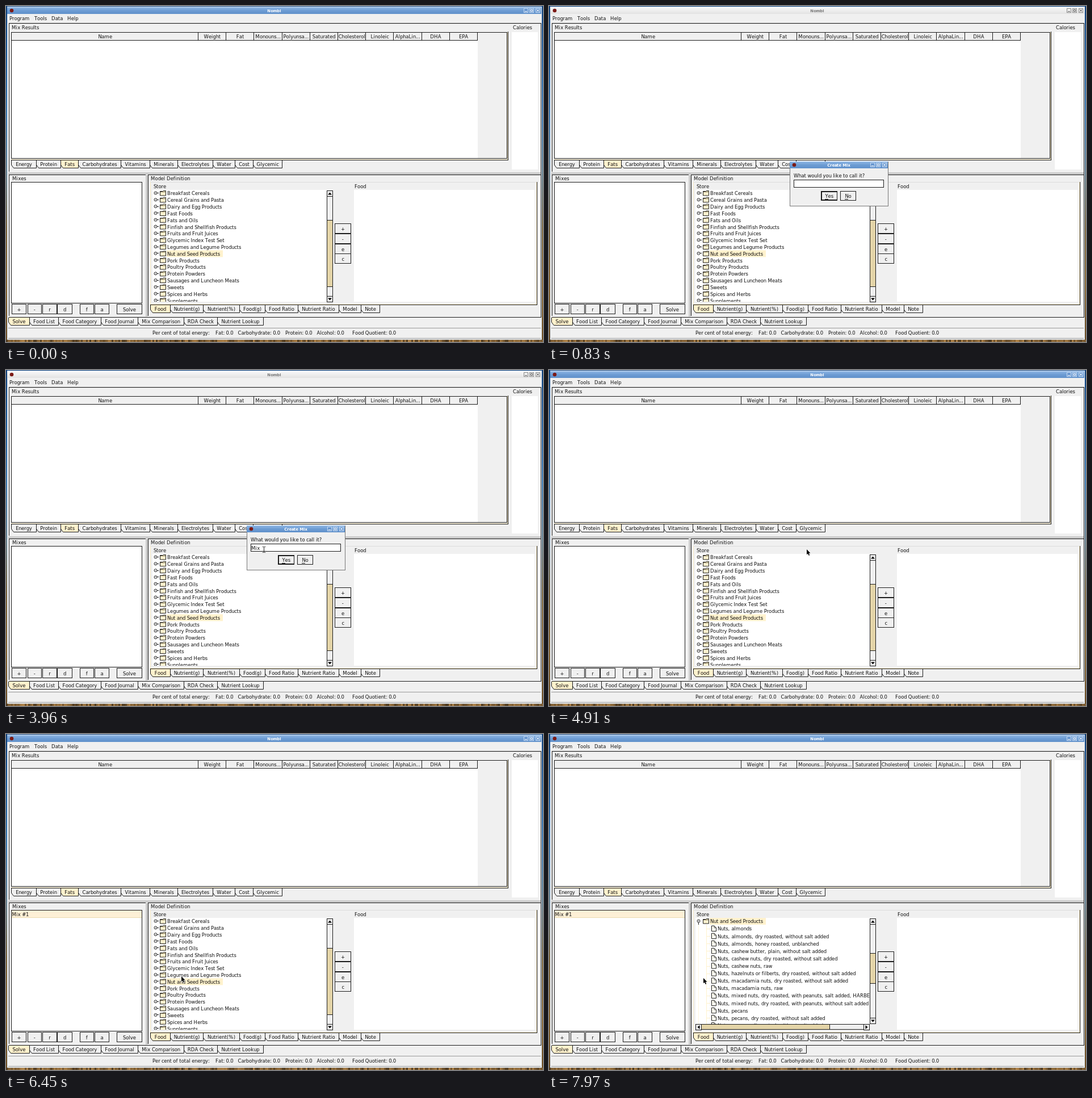
Animation, 946 px wide and 592 px high, one loop 8 s. Source, as an HTML page with a canvas:

```html
<!DOCTYPE html>
<html lang="en">
<head>
<meta charset="utf-8">
<title>Diet planner</title>
<style>
html, body { margin: 0; width: 100%; height: 100%; overflow: hidden; }
canvas { display: block; }
</style>
</head>
<body>
<canvas id="stage" width="946" height="592"></canvas>
<script>
const ctx = document.getElementById('stage').getContext('2d');
const LOOP = 8000, ZOOM = 0.845;
const INK = '#1c1c1c', BG = '#f0f0f0', CREAM = '#fff2cd', WHITE = '#fff';

const rect = (x, y, w, h, fill) => { ctx.fillStyle = fill; ctx.fillRect(x, y, w, h); };
const hline = (x0, x1, y, c = INK) => rect(x0, y, x1 - x0, 1, c);
const vline = (x, y0, y1, c = INK) => rect(x, y0, 1, y1 - y0, c);
const box = (x, y, w, h, fill, edge = INK) => {
  rect(x, y, w, h, edge);
  rect(x + 1, y + 1, w - 2, h - 2, fill);
};

function poly(points, fill, edge, width = 1) {
  ctx.beginPath();
  points.forEach(([x, y]) => ctx.lineTo(x, y));
  if (fill) { ctx.closePath(); ctx.fillStyle = fill; ctx.fill(); }
  if (edge) { ctx.strokeStyle = edge; ctx.lineWidth = width; ctx.stroke(); }
}

function circle(x, y, r, fill, edge) {
  ctx.beginPath();
  ctx.arc(x, y, r, 0, 7);
  ctx.fillStyle = fill;
  ctx.fill();
  if (edge) { ctx.strokeStyle = edge; ctx.lineWidth = 1; ctx.stroke(); }
}

function gradient(x0, y0, x1, y1, colors) {
  const g = ctx.createLinearGradient(x0, y0, x1, y1);
  colors.forEach((c, i) => g.addColorStop(i / (colors.length - 1), c));
  return g;
}

function checker(base, dot) {
  const tile = document.createElement('canvas');
  tile.width = tile.height = 2;
  const p = tile.getContext('2d');
  p.fillStyle = base;
  p.fillRect(0, 0, 2, 2);
  p.fillStyle = dot;
  p.fillRect(0, 0, 1, 1);
  p.fillRect(1, 1, 1, 1);
  return ctx.createPattern(tile, 'repeat');
}
const GRIP = checker('#f4f4f4', '#a2a2a2'), THUMB = checker('#fff0c4', '#c9b98c');

// Text keeps whole-unit letter advances, then the line is scaled as a whole.
const advances = {};
function setFont(font) { ctx.font = font + ' "DejaVu Sans", sans-serif'; }
function advance(ch, font) {
  const key = font + ch;
  if (!(key in advances)) advances[key] = ch === ',' ? 4 : Math.round(ctx.measureText(ch).width);
  return advances[key];
}
function text(s, x, y, { center = false, color = '#111', font = '10px' } = {}) {
  ctx.save();
  setFont(font);
  const steps = [...s].map(ch => advance(ch, font));
  const width = steps.reduce((a, b) => a + b, 0);
  ctx.translate(center ? x - width * ZOOM / 2 : x, y);
  ctx.scale(ZOOM, ZOOM);
  ctx.fillStyle = color;
  let pen = 0;
  [...s].forEach((ch, i) => { ctx.fillText(ch, pen, 0); pen += steps[i]; });
  ctx.restore();
  return width * ZOOM;
}

function button(label, x, y, w, h, fill = BG) {
  box(x, y, w, h, fill);
  text(label, x + w / 2, y + h / 2 + 3.5, { center: true });
}

function tabs(labels, edges, y, selected) {
  labels.forEach((label, i) => {
    const a = edges[i] + 0.5, b = edges[i + 1] + 0.5, bottom = y + 13.5;
    poly([[a, y], [a, y + 8], [a + 4, bottom], [b, bottom], [b, y]], i === selected ? CREAM : BG);
    poly([[a, y], [a, y + 8], [a + 4, bottom], [b, bottom], [b, y]], null, INK);
    text(label, (a + b) / 2, y + 10, { center: true });
  });
}

function titleBar(x, y, w, label, active) {
  const fill = active ? gradient(0, y, 0, y + 12, ['#92b9e6', '#6d9cd3', '#5f90ca'])
                      : gradient(0, y, 0, y + 12, ['#fafafa', '#e2e2e2']);
  const tint = active ? WHITE : '#555';
  rect(x, y, w, 12, fill);
  circle(x + 8, y + 6, 3.3, '#7c1a16');
  text(label, x + w / 2, y + 8.7, { center: true, font: 'bold 8px', color: active ? WHITE : '#777' });
  [27, 17, 6].forEach((d, i) => {
    const cx = x + w - d;
    box(cx - 4, y + 2, 8, 8, active ? '#6796cf' : '#f2f2f2', active ? '#c9dcf3' : '#888');
    if (i === 0) rect(cx - 2, y + 7, 4, 1, tint);
    if (i === 1) box(cx - 2, y + 4, 4, 4, active ? '#6796cf' : WHITE, tint);
    if (i === 2) {
      poly([[cx - 2, y + 4], [cx + 2, y + 8]], null, tint);
      poly([[cx + 2, y + 4], [cx - 2, y + 8]], null, tint);
    }
  });
}

function arrowButton(x, y, dx, dy) {
  box(x, y, 11, 11, BG);
  const cx = x + 5.5, cy = y + 5.5;
  poly([[cx + dx * 2, cy + dy * 2], [cx - dx * 2 - dy * 3.5, cy - dy * 2 - dx * 3.5],
        [cx - dx * 2 + dy * 3.5, cy - dy * 2 + dx * 3.5]], '#000');
}

function verticalBar(bottom, from, to) {
  box(565, 325, 11, bottom - 325, BG);
  box(565, from, 11, to - from, THUMB);
  arrowButton(565, 325, 0, -1);
  arrowButton(565, bottom - 11, 0, 1);
}

function desktop() {
  rect(0, 0, 946, 592, gradient(0, 0, 0, 592,
    ['#0d3e78', '#1c5c9c', '#3a78b0', '#64808f', '#7a6238', '#85632e', '#6a4a20']));
  for (let x = 0; x < 946; x += 3) {
    const n = Math.abs(Math.sin(x * 12.9898) * 43758.5) % 1;
    rect(x, 588, 3, 4, `hsl(34 40% ${22 + n * 28}%)`);
  }
}

function results() {
  hline(5, 942, 30);
  vline(5, 30, 292);
  hline(6, 942, 31, '#d8d8d8');
  text('Mix Results', 10, 41);
  text('Calories', 893, 41);
  rect(891, 46, 46, 242, WHITE);
  vline(884, 45, 271);
  hline(9, 885, 271);
  hline(9, 884, 270, CREAM);
  vline(883, 46, 270, CREAM);
  box(9, 46, 874, 223, BG);
  rect(10, 61, 821, 207, WHITE);
  const heads = ['Name', 'Weight', 'Fat', 'Monouns...', 'Polyunsa...', 'Saturated',
    'Cholesterol', 'Linoleic', 'AlphaLin...', 'DHA', 'EPA'];
  heads.forEach((label, i) => {
    const right = 338 + i * 49.2, left = i ? right - 49.2 : 10;
    vline(Math.round(right), 46, 61);
    text(label, (left + right) / 2 + 0.7, 56.5, { center: true });
  });
  hline(10, 831, 60);
  tabs(['Energy', 'Protein', 'Fats', 'Carbohydrates', 'Vitamins', 'Minerals', 'Electrolytes',
    'Water', 'Cost', 'Glycemic'], [9, 53, 96, 127, 202, 253, 302, 364, 403, 435, 486], 272, 2);
}

function mixes(t) {
  rect(4, 293, 938, 4, GRIP);
  rect(246, 298, 4, 249, GRIP);
  hline(5, 246, 297);
  vline(5, 297, 546);
  text('Mixes', 11, 306.5);
  box(9, 310, 231, 214, WHITE);
  if (t >= 4970) {
    rect(10, 311, 229, 12, '#fdf0d6');
    hline(10, 239, 323, '#eadab0');
    text('Mix #1', 10.5, 320.5);
  }
  const keys = [['+', 10, 26], ['-', 38, 25], ['r', 64, 26], ['d', 90, 27], ['f', 130, 25],
    ['a', 156, 26], ['Solve', 195, 45]];
  keys.forEach(([label, x, w]) => button(label, x, 525, w, 18));
  if (t >= 500 && t < 830) {
    button('+', 10, 525, 26, 18, t < 540 ? '#e6d9b4' : BG);
    ctx.strokeStyle = '#b8ab83';
    ctx.lineWidth = 1;
    ctx.strokeRect(13.5, 528.5, 19, 11);
  }
}

function folder(y) {
  poly([[271.5, y - 3.5], [276, y - 3.5], [277, y - 4.5], [281.5, y - 4.5],
        [281.5, y + 4], [271.5, y + 4]], CREAM, INK);
  poly([[271.5, y + 4], [271.5, y - 3.5]], null, INK);
  hline(272, 282, Math.round(y - 3), '#6a6047');
}

function handle(y, open) {
  if (open) vline(263, y + 2, y + 6);
  else hline(265, 269, Math.round(y) - 1);
  circle(263.5, y - 0.5, 2.5, WHITE, INK);
  rect(263, Math.round(y) - 1, 1, 1, INK);
}

function groupRow(label, y, selected, open) {
  handle(y, open);
  folder(y);
  if (selected) rect(283, y - 6, 99, 12, CREAM);
  text(label, 284, y + 3.4);
}

const GROUPS = ['Breakfast Cereals', 'Cereal Grains and Pasta', 'Dairy and Egg Products',
  'Fast Foods', 'Fats and Oils', 'Finfish and Shellfish Products', 'Fruits and Fruit Juices',
  'Glycemic Index Test Set', 'Legumes and Legume Products', 'Nut and Seed Products',
  'Pork Products', 'Poultry Products', 'Protein Powders', 'Sausages and Luncheon Meats',
  'Sweets', 'Spices and Herbs', 'Supplements'];
const NUTS = ['almonds', 'almonds, dry roasted, without salt added',
  'almonds, honey roasted, unblanched', 'cashew butter, plain, without salt added',
  'cashew nuts, dry roasted, without salt added', 'cashew nuts, raw',
  'hazelnuts or filberts, dry roasted, without salt added',
  'macadamia nuts, dry roasted, without salt added', 'macadamia nuts, raw',
  'mixed nuts, dry roasted, with peanuts, salt added, HARBEL',
  'mixed nuts, dry roasted, with peanuts, without salt added', 'pecans',
  'pecans, dry roasted, without salt added', 'pecans, oil roasted, without salt added'];

function store(open) {
  const bottom = open ? 511 : 521;
  rect(258, 324, 307, bottom - 324, WHITE);
  ctx.save();
  ctx.beginPath();
  ctx.rect(258, 324, 307, bottom - 324);
  ctx.clip();
  if (open) {
    vline(263, 336, 511, '#fff6dd');
    vline(277, 336, 511, '#fff2cd');
    groupRow('Nut and Seed Products', 330, true, true);
    NUTS.forEach((name, i) => {
      const y = 343 + i * 13.12;
      hline(278, 284, Math.round(y), '#fff2cd');
      poly([[286.5, y - 5], [291, y - 5], [294.5, y - 1.5], [294.5, y + 4.5], [286.5, y + 4.5], [286.5, y - 5]],
        '#fffdf2', INK);
      poly([[291, y - 5], [291, y - 1.5], [294.5, y - 1.5]], null, INK, 0.7);
      text('Nuts, ' + name, 297, y + 3.4);
    });
  } else {
    GROUPS.forEach((name, i) => groupRow(name, 330 + i * 11.82, i === 9, false));
  }
  ctx.restore();
  if (open) {
    verticalBar(511, 386, 440);
    box(258, 511, 307, 10, BG);
    box(268, 511, 227, 10, THUMB);
    arrowButton(258, 511, -1, 0);
    arrowButton(554, 511, 1, 0);
  } else {
    verticalBar(522, 377, 495);
  }
}

function model(open) {
  hline(250, 942, 297);
  vline(250, 297, 546);
  text('Model Definition', 255, 306.5);
  hline(254, 935, 310, '#dcdcdc');
  vline(254, 310, 526, CREAM);
  vline(934, 310, 526, CREAM);
  vline(935, 310, 527);
  hline(254, 935, 525, CREAM);
  hline(254, 936, 526);
  text('Store', 260, 320.5);
  text('Food', 614, 320.5);
  rect(613, 324, 318, 197, WHITE);
  store(open);
  ['+', '-', 'e', 'c'].forEach((label, i) =>
    button(label, 579, Math.round(383 + i * 17.8), 29, 18));
  tabs(['Food', 'Nutrient(g)', 'Nutrient(%)', 'Food(g)', 'Food Ratio', 'Nutrient Ratio', 'Model', 'Note'],
    [254, 289, 347, 411, 456, 514, 586, 625, 658], 527, 0);
}

function footer() {
  hline(5, 943, 548);
  vline(942, 30, 549);
  tabs(['Solve', 'Food List', 'Food Category', 'Food Journal', 'Mix Comparison', 'RDA Check', 'Nutrient Lookup'],
    [4, 41, 92, 167, 232, 313, 372, 453], 549, 0);
  hline(4, 942, 567, '#9a9a9a');
  hline(4, 942, 585, '#9a9a9a');
  const parts = [['Per cent of total energy:', 258], ['Fat: 0.0', 369], ['Carbohydrate: 0.0', 408.5],
    ['Protein: 0.0', 492], ['Alcohol: 0.0', 547.5], ['Food Quotient: 0.0', 610]];
  parts.forEach(([label, x]) => text(label, x, 579));
}

const TYPING = [[2760, 'M'], [2930, 'Mi'], [3240, 'Mix'], [3440, 'Mix '], [4350, 'Mix #'], [4480, 'Mix #1']];

function dialog(t) {
  box(424, 274, 174, 79, BG, '#777');
  titleBar(424, 274, 173, 'Create Mix', true);
  if (t < 830) return;
  text('What would you like to call it?', 431, 301.7);
  box(431, 306, 159, 14, WHITE);
  const typed = TYPING.filter(([at]) => t >= at).map(([, s]) => s).pop() || '';
  const width = text(typed, 432, 316.5);
  const caret = t >= 1670 && t < 2200 || t >= 2680 && t < 3960 || t >= 4350;
  if (caret) vline(Math.round(432 + width), 308, 319, '#000');
  box(479, 326, 29, 17, BG);
  ctx.strokeStyle = INK;
  ctx.lineWidth = 1;
  ctx.strokeRect(480.5, 327.5, 27, 14);
  text('Yes', 493.7, 338, { center: true });
  hline(486, 492, 340);
  button('No', 513, 326, 28, 17);
  hline(521, 527, 340);
}

// Pointer stops: time, x, y. Moves are sampled every 40 ms.
const PATH = [[4910, 454, 316], [6050, 454, 316], [6130, 438, 329], [6250, 380, 378], [6450, 309, 427],
  [6600, 281, 434], [6770, 269, 435], [6980, 269, 435], [7140, 266, 434], [7570, 266, 434],
  [7730, 270, 435], [7850, 273, 433], [7970, 272, 430], [8000, 272, 430]];

function pointer(t) {
  const start = t < 7000 ? 6090 : t < 7500 ? 7020 : 7610;
  const s = t < start ? t : start + Math.floor((t - start) / 40) * 40;
  const i = PATH.findIndex(([at]) => at > s);
  const [t0, x0, y0] = PATH[i - 1], [t1, x1, y1] = PATH[i];
  const k = (s - t0) / (t1 - t0);
  ctx.save();
  ctx.translate(x0 + (x1 - x0) * k, y0 + (y1 - y0) * k);
  const shape = [[0, 0], [0, 9.3], [2.1, 7.4], [3.7, 11], [5.2, 10.3], [3.7, 6.8], [6.6, 6.8], [0, 0]];
  poly(shape, null, WHITE, 1.4);
  poly(shape, '#000');
  ctx.restore();
}

function beam(t) {
  const k = Math.min(4, Math.floor((t - 1510) / 40)) / 4;
  const x = Math.round(450 + 4 * k), y = Math.round(320 - 4 * k);
  vline(x, y - 4, y + 5, '#222');
  for (const end of [y - 5, y + 5]) {
    rect(x - 2, end, 2, 1, '#222');
    rect(x + 1, end, 2, 1, '#222');
  }
}

function draw(t) {
  const busy = t >= 830 && t < 4910;
  desktop();
  rect(2, 1, 942, 587, '#d9e4f1');
  rect(3, 14, 940, 573, BG);
  titleBar(2, 2, 941, 'Nombi', !busy);
  [['Program', 6], ['Tools', 50], ['Data', 80], ['Help', 108]].forEach(([s, x]) => text(s, x, 25));
  results();
  mixes(t);
  model(t >= 7350);
  footer();
  if (t >= 680 && t < 4910) dialog(t);
  if (t >= 1510 && t < 4910) beam(t);
  if (t >= 4910) pointer(t);
}

function frame() {
  draw(performance.now() % LOOP);
  requestAnimationFrame(frame);
}
frame();
</script>
</body>
</html>
```
